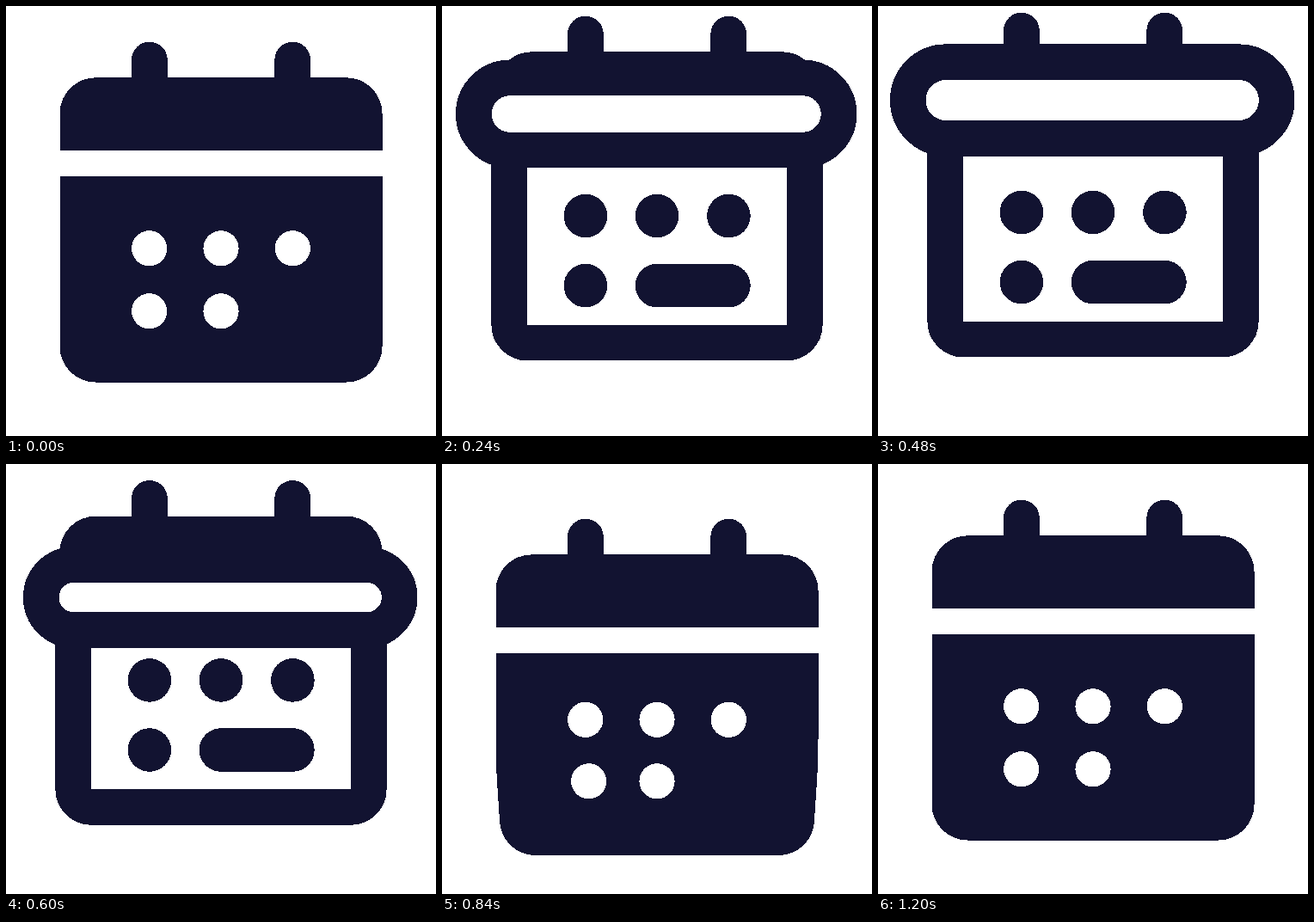
Write an HTML page that moves like this. It is 500 px wide and 500 px high and loops after 3730 ms.

```html
<!DOCTYPE html>
<html lang="en">
<head>
<meta charset="utf-8">
<title>Calendar</title>
<style>
  html, body { margin: 0; width: 100%; height: 100%; overflow: hidden; background: #fff; }
  svg { display: block; width: 100%; height: 100%; }
</style>
</head>
<body>
<svg viewBox="0 0 500 500" fill="#121331" shape-rendering="crispEdges">
  <g id="top">
    <path d="M62.5 167.5V125A41.7 41.7 0 0 1 104.2 83.3H395.8A41.7 41.7 0 0 1 437.5 125V167.5Z"/>
    <path d="M166.9 62.5V90M333.2 62.5V90" stroke="#121331" stroke-width="41.7" stroke-linecap="round"/>
  </g>
  <g id="solid">
    <path id="body"/>
    <path id="holes" stroke="#fff" stroke-width="41.2" stroke-linecap="round"/>
  </g>
  <g id="outline" stroke="#121331" stroke-width="41.67">
    <path id="box" fill="none"/>
    <path id="marks" stroke-width="50.6" stroke-linecap="round"/>
    <rect id="lid" fill="#fff"/>
  </g>
</svg>
<script>
const LOOP = 3730, STEP = 30, END = 1200;
const el = id => document.getElementById(id);
const set = (id, attrs) => {
  for (const name in attrs) el(id).setAttribute(name, attrs[name]);
};

// Keys are [time, value, speed per ms].
const JUMP = [
  [0, 0, 0], [120, -10, -.165], [240, -30, -.12], [345, -36, 0], [370, -36, 0],
  [480, -34, .054], [540, -29.6, .096], [600, -22.6, .14], [850, 22.2, 0], [1095, 0, 0]
];
const TAPER = [[705, 0, 0], [850, 4.5, 0], [1080, -6, 0], [1200, 0, 0]];

function curve(keys, t) {
  if (t <= keys[0][0]) return keys[0][1];
  const i = keys.findIndex(k => k[0] > t);
  if (i < 0) return keys[keys.length - 1][1];
  const [t0, a, va] = keys[i - 1], [t1, b, vb] = keys[i];
  const span = t1 - t0, u = (t - t0) / span, w = 1 - u;
  return a * w * w * (1 + 2 * u) + b * u * u * (3 - 2 * u)
    + span * u * w * (va * w - vb * u);
}

function drawSolid(dy, k) {
  const r = 41.7, top = 197.9 + dy, bottom = 437.5 + dy * .795;
  const left = 62.5, right = 437.5, bend = top + 100, low = bottom - r;
  const c1 = bend + (low - bend) * .4, c2 = bend + (low - bend) * .65;
  set('body', { d: `M${left} ${top}H${right}V${bend}
    C${right} ${c1} ${right - k * .55} ${c2} ${right - k} ${low}
    A${r} ${r} 0 0 1 ${right - k - r} ${bottom}H${left + k + r}
    A${r} ${r} 0 0 1 ${left + k} ${low}
    C${left + k * .55} ${c2} ${left} ${c1} ${left} ${bend}Z` });
  const y1 = 281.8 + dy * .705, y2 = 354.8 + dy * .636;
  set('holes', { d: `M166.7 ${y1}h0M250 ${y1}h0M333.3 ${y1}h0M${166.7 + k * .9} ${y2}h0M250 ${y2}h0` });
}

function drawOutline(dy) {
  const cy = 245.5 + 4 * dy, w = 393.2 - 1.05 * dy, h = 51.2 - 1.1 * dy;
  const bottom = 421.5 + dy, r = 20.83;
  set('lid', { x: 249.2 - w / 2, y: cy - h / 2, width: w, height: h, rx: h / 2 });
  set('box', { d: `M78.2 ${cy}V${bottom - r}a${r} ${r} 0 0 0 ${r} ${r}
    H${421.8 - r}a${r} ${r} 0 0 0 ${r} ${-r}V${cy}` });
  const y1 = 274 + dy, y2 = 355.1 + dy;
  set('marks', { d: `M166.9 ${y1}h0M250 ${y1}h0M333.4 ${y1}h0M166.9 ${y2}h0M250 ${y2}H333.4` });
}

function draw(ms) {
  const t = Math.min(Math.floor(ms / STEP) * STEP, END);
  const dy = curve(JUMP, t), open = dy < 0;
  set('top', { transform: `translate(0 ${dy})` });
  set('solid', { display: open ? 'none' : 'inline' });
  set('outline', { display: open ? 'inline' : 'none' });
  if (open) drawOutline(dy);
  else drawSolid(dy, curve(TAPER, t));
}

const start = performance.now();
function tick() {
  draw((performance.now() - start) % LOOP);
  requestAnimationFrame(tick);
}
tick();
</script>
</body>
</html>
```
